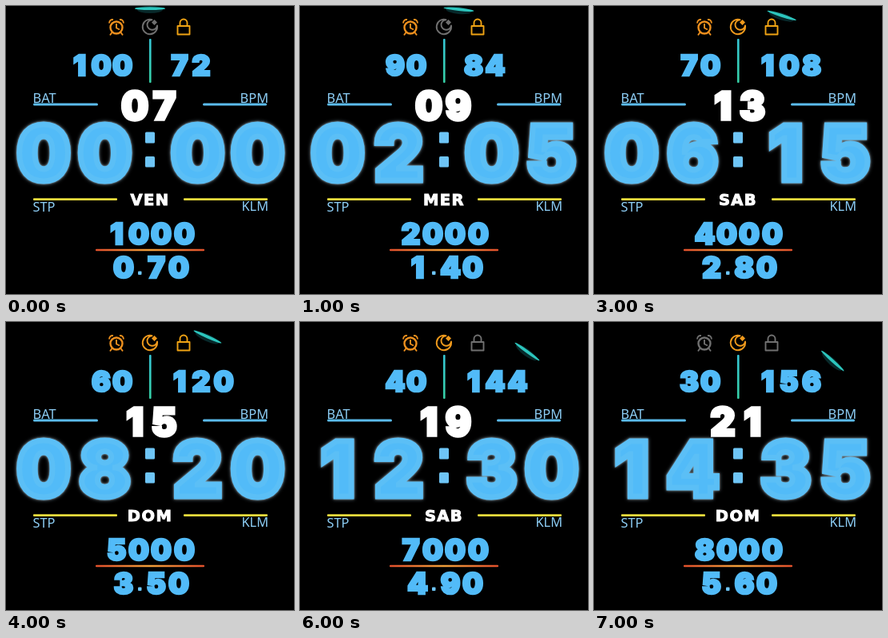
An HTML page that plays this animation: 360 by 360 pixels, repeating every 8000 ms.

```html
<!DOCTYPE html>
<html lang="it">
<head>
<meta charset="utf-8">
<title>Watch face</title>
<style>
  html, body { margin: 0; width: 100%; height: 100%; overflow: hidden; background: #000; }
  svg { display: block; width: 100vw; height: 100vh; }
  .num {
    font-family: Inter, sans-serif; font-weight: 900; font-optical-sizing: none;
    text-anchor: middle; fill: #52bbf8; stroke: #52bbf8;
    stroke-width: .075em; stroke-linejoin: miter; stroke-miterlimit: 3;
  }
  .white { fill: #fff; stroke: #fff; }
  .big { font-size: 94.5px; stroke: #5bbff6; filter: drop-shadow(0 0 1px #b9dcefa0) drop-shadow(0 0 2px #8fa9b890); }
  .small { font-size: 35.5px; }
  .medium { font-size: 36.5px; }
  .day { font: bold 19.5px "DejaVu Sans", sans-serif; letter-spacing: 1.4px; stroke-width: 1px; }
  .label { font: 16.4px "Noto Sans", "Open Sans", sans-serif; fill: #8dcef6; }
  .end { text-anchor: end; }
  .icon { fill: none; stroke: currentColor; stroke-width: 1.9; stroke-linejoin: round; }
</style>
</head>
<body>
<svg viewBox="0 0 360 360">
  <defs>
    <linearGradient id="teal" x2="0" y2="1">
      <stop stop-color="#36c6d6"/><stop offset="1" stop-color="#36cfa4"/>
    </linearGradient>
    <linearGradient id="ember">
      <stop stop-color="#e2502c"/><stop offset=".5" stop-color="#f0a03a"/><stop offset="1" stop-color="#e2502c"/>
    </linearGradient>
  </defs>

  <g id="hand">
    <ellipse cx="180" cy="4.5" rx="16" ry="4.5" fill="#0b3a3c" opacity=".7"/>
    <ellipse cx="180" cy="3.2" rx="19" ry="1.9" fill="#2cc5bd"/>
  </g>

  <g id="alarm" class="icon">
    <circle cx="138" cy="27" r="7.5" stroke-width="2.4"/>
    <path d="M138 22V27.5L142 29.5M129 21.5Q129.5 16.5 134 17M147 21.5Q146.5 16.5 142 17M132.5 33L130 36.5M143.5 33L146 36.5"/>
  </g>
  <g id="moon" class="icon">
    <path d="M182.5 17.2A9.2 9.2 0 1 0 189 24.5A6.3 6.3 0 1 1 182.5 17.2Z"/>
    <path d="M185.5 17L189 20.5L185.5 24L182 20.5Z" fill="currentColor" stroke="none"/>
  </g>
  <path id="lock" class="icon" d="M214.5 25H229.5V35.5H214.5ZM217.5 25V21A4.5 4.5 0 0 1 226.5 21V25"/>

  <rect x="179" y="41" width="2.6" height="55" rx="1" fill="url(#teal)"/>
  <g fill="#5bbcec">
    <rect x="34" y="121.5" width="81" height="3" rx="1.5"/>
    <rect x="246" y="121.5" width="80" height="3" rx="1.5"/>
  </g>
  <g fill="#eadb3c">
    <rect x="34" y="240.3" width="105" height="2.7" rx="1"/>
    <rect x="222" y="240.3" width="105" height="2.7" rx="1"/>
  </g>
  <rect x="112" y="303.8" width="136" height="2.4" rx="1" fill="url(#ember)"/>

  <text class="label" x="33.5" y="120.5">BAT</text>
  <text class="label end" x="328" y="120.5">BPM</text>
  <text class="label" x="33.5" y="256.5">STP</text>
  <text class="label end" x="328" y="255.5">KLM</text>

  <g fill="#6ec5f6">
    <rect x="174" y="157.5" width="12" height="14" rx="1.5"/>
    <rect x="174" y="188" width="12" height="13.5" rx="1.5"/>
    <rect x="165" y="331.5" width="4.5" height="4.5" rx="1"/>
  </g>

  <text id="battery" class="num small" y="87.4"></text>
  <text id="pulse" class="num small" x="217 244 272" y="87.4"></text>
  <text id="date" class="num white" font-size="48" x="161 198" y="142"></text>
  <text id="time" class="num big" x="47 123.5 239.5 314.5" y="218.4"></text>
  <text id="weekday" class="num white day" x="180" y="248.7"></text>
  <text id="steps" class="num medium" x="138.5 166 194 223" y="297.8"></text>
  <text id="distance" class="num medium" x="147 188 216" y="340"></text>
</svg>
<script>
const el = id => document.getElementById(id);
const pad = n => String(n).padStart(2, "0");
const weekdays = ["VEN", "MER", "VEN", "SAB", "DOM", "VEN", "SAB", "DOM"];
const light = (id, on, color) => { el(id).style.color = on ? color : "#707070"; };
const write = (id, value) => { el(id).textContent = value; };
let shown = -1;

function show(k) {
  const battery = String(100 - 10 * k);
  // Battery digits are aligned to the right.
  el("battery").setAttribute("x", [92, 119, 145.5].slice(-battery.length).join(" "));
  write("battery", battery);
  write("pulse", 72 + 12 * k);
  write("date", pad(7 + 2 * k));
  write("time", pad(2 * k) + pad(5 * k));
  write("weekday", weekdays[k]);
  write("steps", 1000 * (k + 1));
  write("distance", pad(7 * (k + 1)) + "0");
  light("alarm", k < 7, "#ee901e");
  light("moon", k > 2, "#f09a1c");
  light("lock", k < 5, "#efa314");
  el("hand").setAttribute("transform", `rotate(${6 * k} 180 180)`);
}

function tick() {
  const k = Math.floor(performance.now() / 1000) % 8;
  if (k !== shown) show(shown = k);
  requestAnimationFrame(tick);
}
tick();
</script>
</body>
</html>
```
